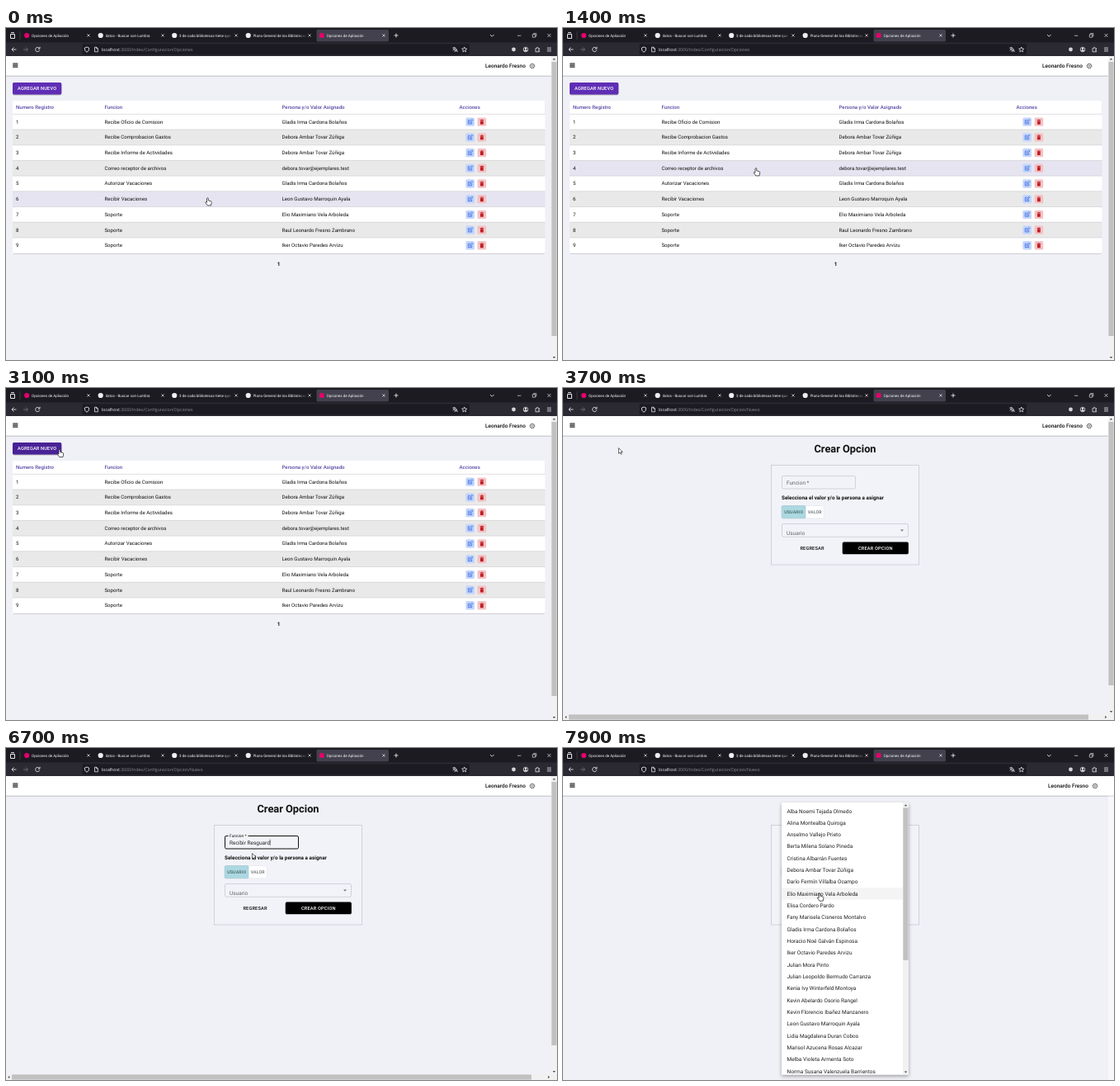
Write an HTML page that moves like this. It is 668x402 px and loops after 8 s.

```html
<!DOCTYPE html>
<html lang="es">
<head>
<meta charset="utf-8">
<style>
html, body { margin: 0; width: 100%; height: 100%; overflow: hidden; background: #f0f1f7; }
svg { display: block; width: 668px; height: 402px; font-family: Roboto, Arial, sans-serif; text-rendering: geometricPrecision; }
.ui { font-family: "Open Sans", "Noto Sans", sans-serif; }
</style>
</head>
<body>
<svg id="stage" viewBox="0 0 668 402" xmlns="http://www.w3.org/2000/svg"></svg>
<script>
const LOOP = 8000;
const PAGE_SWAP = 3600, FOCUS = 4800, MENU_OPEN = 7300;
const ROW_TOP = 104.3, ROW_H = 18.7;
const ITEM_TOP = 69, ITEM_H = 14.33;
const TYPED = "Recibir Resguardos";

const rect = (x, y, w, h, fill, extra = "") =>
  `<rect x="${x}" y="${y}" width="${w}" height="${h}" fill="${fill}" ${extra}/>`;
const text = (x, y, size, str, fill = "#111", weight = 400, extra = "") =>
  `<text x="${x}" y="${y}" font-size="${size}" fill="${fill}" font-weight="${weight}" ${extra}>${str}</text>`;
const line = (d, color = "#fbfbfe", width = .8, extra = "") =>
  `<path d="${d}" fill="none" stroke="${color}" stroke-width="${width}" ${extra}/>`;
const shape = (d, fill) => `<path d="${d}" fill="${fill}"/>`;
const circle = (x, y, r, fill) => `<circle cx="${x}" cy="${y}" r="${r}" fill="${fill}"/>`;
const group = (id, body, extra = "") => `<g id="${id}" ${extra}>${body}</g>`;
const caps = (x, y, str, fill, size = 5.65) =>
  text(x, y, size, str, fill, 500, 'text-anchor="middle" letter-spacing=".16"');

const people = [
  "Alba Noemi Tejada Olmedo", "Alina Montealba Quiroga", "Anselmo Vallejo Prieto",
  "Berta Milena Solano Pineda", "Cristina Albarrán Fuentes", "Debora Ambar Tovar Zúñiga",
  "Darío Fermín Villalba Ocampo", "Elio Maximiano Vela Arboleda", "Elisa Cordero Pardo",
  "Fany Marisela Cisneros Montalvo", "Gladis Irma Cardona Bolaños", "Horacio Noé Galván Espinosa",
  "Iker Octavio Paredes Arvizu", "Julian Mora Pinto", "Julian Leopoldo Bermudo Carranza",
  "Kenia Ivy Winterfeld Montoya", "Kevin Abelardo Osorio Rangel", "Kevin Florencio Ibañez Manzanero",
  "Leon Gustavo Marroquin Ayala", "Lidia Magdalena Duran Cobos", "Marisol Azucena Rosas Alcazar",
  "Melba Violeta Armenta Soto", "Norma Susana Valenzuela Barrientos"
];
const rows = [
  ["Recibe Oficio de Comision", people[10]],
  ["Recibe Comprobacion Gastos", people[5]],
  ["Recibe Informe de Actividades", people[5]],
  ["Correo receptor de archivos", "debora.tovar@ejemplares.test"],
  ["Autorizar Vacaciones", people[10]],
  ["Recibir Vacaciones", people[18]],
  ["Soporte", people[7]],
  ["Soporte", "Raul Leonardo Fresno Zambrano"],
  ["Soporte", people[12]]
];

function browserBar() {
  const tabs = [
    [22, "#e5006d", "Opciones de Apliación", 100],
    [111.5, "#efeff2", "datos - Buscar con Lumbra", 190],
    [201, "#efeff2", "3 de cada bibliotecas tiene que", 279],
    [290.5, "#efeff2", "Plano General de las Bibliotecas", 368],
    [379.5, "#e5006d", "Opciones de Apliación", 458]
  ];
  const cross = (x, y, r) => line(`M${x - r} ${y - r}l${2 * r} ${2 * r}m0 ${-2 * r}l${-2 * r} ${2 * r}`, "#fbfbfe", .65);
  let s = rect(0, 0, 668, 18, "#1c1b22") + rect(0, 17.5, 668, 16.5, "#2b2a33");
  s += line("M5.5 7.5h5v5h-5zM6 5.6h4", "#fbfbfe", .9) + line("M17 4v10", "#55545e", .5);
  s += rect(376.5, 2, 87.5, 14.5, "#42414d", 'rx="1.8"');
  tabs.forEach(([x, color, title, close], i) => {
    s += circle(x + 3.2, 9, 3.1, color);
    s += `<svg x="${x + 9}" y="0" width="66" height="18">${text(0, 10.8, 4.55, title, "#fbfbfe")}</svg>`;
    if (i === 2 || i === 3) s += rect(x + 62, 4, 13, 10, "url(#fade)");
    s += cross(close, 9, 1.6);
  });
  s += line("M470.5 9h5M473 6.5v5") + line("M587 8l2.3 2.3 2.3-2.3") + line("M620 9.3h4.4", "#fbfbfe", .6);
  s += line("M638.3 7.8h3.4v3.4h-3.4zM639.5 7.5v-.9h3.4v3.4h-1", "#fbfbfe", .6) + cross(658.5, 9, 2);
  s += line("M12.5 26h-5.5m2.5-2.5l-2.5 2.5 2.5 2.5") + line("M21 26h5.5m-2.5-2.5l2.5 2.5-2.5 2.5", "#77767f");
  s += line("M40.3 24.4a2.6 2.6 0 1 0 .5 2.1M41 22.8v2.2h-2.2");
  s += rect(92.5, 19.2, 469.5, 13, "#1c1b22", 'rx="1.8"');
  s += line("M98 23l2.6 1c0 3-.6 4.2-2.6 5.2-2-1-2.6-2.2-2.6-5.2z");
  s += line("M107.5 23.2h2.3l1.6 1.6v4h-3.9zM109.6 23.2v1.8h1.8", "#fbfbfe", .7);
  s += `<text x="116" y="27.9" font-size="5.2" fill="#8f8e98"><tspan fill="#fbfbfe">localhost</tspan><tspan id="path"></tspan></text>`;
  s += line("M541.3 24h4m-2-1v1m1.3 0c-.5 1.7-1.7 2.6-3 3.2m.6-2.4c.5 1 1.2 1.6 2 2M544 29l1.7-4 1.7 4m-2.8-1.3h2.2", "#fbfbfe", .7);
  s += line("M555.7 23l.9 2 2.2.2-1.7 1.4.5 2.2-1.9-1.1-1.9 1.1.5-2.2-1.7-1.4 2.2-.2z", "#fbfbfe", .7);
  s += circle(615.5, 26, 2.4, "#d5d5da");
  s += `<circle cx="630" cy="26" r="2.8" fill="none" stroke="#fbfbfe" stroke-width=".7"/>` + circle(630, 25.2, 1.1, "#fbfbfe") + shape("M628 28a2 1.6 0 0 1 4 0z", "#fbfbfe");
  s += line("M642 24.6h1.5c-.5-1.8 2-1.8 1.5 0h1.6v1.5c-1.7-.4-1.7 1.8 0 1.4v1.3H642z", "#fbfbfe", .7);
  s += line("M656 24h5m-5 2h5m-5 2h5", "#fbfbfe", .7);
  return group("bar", s, 'class="ui"');
}

function siteHeader() {
  const ring = (r, width, extra = "") => `<circle cx="638" cy="46" r="${r}" fill="none" stroke="#444" stroke-width="${width}" ${extra}/>`;
  const gear = ring(2.9, .8, 'stroke-dasharray="1.3 .98"') + ring(2.4, .6) + ring(.9, .5);
  return rect(0, 34, 668, 23.6, "#fff", 'filter="url(#soft)"') +
    rect(8.3, 42.4, 6, 5.6, "#999") + line("M8.3 43h6m-6 2.2h6m-6 2.2h6", "#555", 1.2) +
    group("account", text(581, 48.2, 6.5, "Leonardo Fresno", "#111", 500) + gear);
}

function listPage() {
  let s = group("addBtn", rect(8, 66, 59.3, 14.5, "#5e2db4", 'rx="1.7" filter="url(#soft)"')) +
    caps(37.7, 75.2, "AGREGAR NUEVO", "#fff");
  s += rect(8, 88, 645.5, 184.5, "#fff", 'rx="1.7" filter="url(#soft)"');
  [[12, "Numero Registro"], [119.5, "Funcion"], [334.5, "Persona y/o Valor Asignado"], [549.5, "Acciones"]]
    .forEach(([x, label]) => s += text(x, 98.4, 6.1, label, "#5a4aa6", 500));
  rows.forEach(([task, owner], i) => {
    const y = ROW_TOP + i * ROW_H, mid = y + ROW_H / 2, base = mid + 2;
    s += rect(8, y, 645.5, ROW_H, i % 2 ? "#e9e9e9" : "#fff", `id="row${i}"`);
    s += line(`M8 ${y}h645.5`, "#bcbcc2", .5);
    s += text(12, base, 6.1, i + 1) + text(119.5, base, 6.1, task) + text(334.5, base, 6.1, owner);
    s += rect(557.4, mid - 5.2, 10.6, 10.4, "#c3d6fb", 'rx="1.6"') + rect(571.6, mid - 5.2, 10.6, 10.4, "#f3c3c6", 'rx="1.6"');
    s += line(`M562.5 ${mid - 2}h-2.2v4.4h4.4v-2.2M562 ${mid + .8}l.2-1.2 2.7-2.7 1 1-2.7 2.7z`, "#1d4ed8", .65);
    s += shape(`M574.6 ${mid - 2.4}h1.4l.4-.6h1l.4.6h1.4v.8h-4.6zM575 ${mid - 1.2}h3.8v3.6q0 .6-.6.6h-2.6q-.6 0-.6-.6z`, "#c01f25");
  });
  s += text(330.6, 288.2, 6.5, "1", "#111", 700, 'text-anchor="middle"');
  return group("list", s);
}

function formPage() {
  let s = text(342, 77.6, 12.8, "Crear Opcion", "#111", 700, 'text-anchor="middle"');
  s += rect(252.5, 93.5, 179, 120.5, "#f2f3f8", 'stroke="#bdbdc4" stroke-width=".6"');
  s += rect(265.5, 106.5, 89, 15.5, "none", 'rx="1.6" id="field"');
  s += rect(269.5, 105.5, 0, 2, "#f2f3f8", 'id="fieldNotch"');
  s += text(271, 116.6, 6.5, "Funcion *", "#666", 400, 'id="fieldLabel"') + text(271, 116.6, 6.5, "", "#222", 400, 'id="typed"');
  s += rect(271, 110.6, .5, 7.6, "#111", 'id="caret"');
  s += text(265, 134.6, 6.36, "Selecciona el valor y/o la persona a asignar", "#111", 700);
  s += rect(265.2, 142.6, 51, 15.2, "#fff", 'rx="1.6" stroke="#dcdce2" stroke-width=".5"');
  s += rect(265.2, 142.6, 28.8, 15.2, "#abd8e1", 'rx="1.4" stroke="#93bcc6" stroke-width=".5"');
  s += caps(279.7, 152.1, "USUARIO", "#47636b", 5.25) + caps(305.2, 152.1, "VALOR", "#666", 5.25);
  s += rect(265.5, 164.5, 153, 15.8, "none", 'rx="1.6" id="select"');
  s += rect(269.5, 163.5, 0, 2, "#f2f3f8", 'id="selectNotch"');
  s += text(271, 177.6, 6.5, "Usuario", "#666", 400, 'id="selectLabel"');
  s += `<path id="arrow" d="M-2-1h4L0 1z" fill="#666"/>`;
  s += caps(302, 196, "REGRESAR", "#111");
  s += rect(338.8, 186.5, 80, 14.4, "#000", 'rx="1.6" filter="url(#soft)"') + caps(378.8, 196, "CREAR OPCION", "#fff");
  return group("form", s);
}

function menu() {
  let s = rect(265, 66, 154, 329.5, "#fff", 'rx="1.6" filter="url(#lift)"');
  s += rect(265, 0, 147, ITEM_H, "#f4f4f4", 'id="itemHover"');
  people.forEach((name, i) => s += text(271.5, ITEM_TOP + i * ITEM_H + 9.5, 6.5, name, "#222"));
  s += rect(412, 66, 7, 329.5, "#f1f1f1") + rect(412.4, 72.5, 6.2, 184.5, "#c1c1c1");
  s += shape("M413.7 70.3h3.6l-1.8-2zM413.7 391.4h3.6l-1.8 2z", "#505050");
  return group("menu", s);
}

function scrollbars() {
  const bar = (bottom, end) => rect(661, 34, 7, bottom - 34, "#f1f1f1") + rect(661.4, 41, 6.2, end - 41, "#c1c1c1") +
    shape(`M662.7 38.6h3.6l-1.8-2zM662.7 ${bottom - 4}h3.6l-1.8 2z`, "#505050");
  return group("listBars", bar(402, 373)) +
    group("formBars", rect(0, 395, 668, 7, "#f1f1f1") + bar(395, 360) + rect(7, 395.4, 630, 6.2, "#c1c1c1") +
      shape("M4.3 396.7v3.6l-2-1.8zM657.2 396.7v3.6l2-1.8z", "#505050")) +
    group("gutter", rect(661, 58.5, 7, 343.5, "#f8f8fb"));
}

const cursors = group("cursor",
  group("hand", `<path d="M0 .9Q.9-.6 1.8.9V3.6L5 4.5Q5.9 4.9 5.7 6L5 9.6H.8L-1.8 6Q-1.6 4.6 0 5.9Z" fill="#fff" stroke="#111" stroke-width=".7"/>`) +
  group("pointer", `<path d="M0 0V6.7L1.6 5.3 2.7 7.7 3.8 7.2 2.7 4.8H4.8Z" fill="#fff" stroke="#111" stroke-width=".6"/>`) +
  group("beam", line("M-1.6-3.4h1.3l.3.4.3-.4H1.6M0-3V3M-1.6 3.4h1.3L0 3l.3.4H1.6", "#111", .7)));

const stage = document.getElementById("stage");
stage.innerHTML = `<defs>
  <linearGradient id="fade"><stop offset="0" stop-color="#1c1b22" stop-opacity="0"/><stop offset="1" stop-color="#1c1b22"/></linearGradient>
  <filter id="soft" x="-10%" y="-20%" width="120%" height="150%"><feDropShadow dx="0" dy=".6" stdDeviation=".6" flood-opacity=".4"/></filter>
  <filter id="lift" x="-10%" y="-10%" width="120%" height="120%"><feDropShadow dx="0" dy="2" stdDeviation="2" flood-opacity=".35"/></filter>
</defs>` + rect(0, 0, 668, 402, "#f0f1f7") + listPage() + formPage() + siteHeader() + scrollbars() + menu() + browserBar() + cursors;

const el = {};
stage.querySelectorAll("[id]").forEach(node => el[node.id] = node);
const show = (node, on) => node.setAttribute("display", on ? "inline" : "none");
const set = (node, attrs) => { for (const k in attrs) node.setAttribute(k, attrs[k]); };
const clamp01 = v => Math.max(0, Math.min(1, v));
const mix = (a, b, p) => a + (b - a) * p;

// Each key is [time, value, value...], joined linearly.
function track(keys, t) {
  const next = keys.findIndex(k => k[0] > t);
  if (next < 0) return keys[keys.length - 1].slice(1);
  if (next === 0) return keys[0].slice(1);
  const a = keys[next - 1], b = keys[next], p = (t - a[0]) / (b[0] - a[0]);
  return a.slice(1).map((v, i) => mix(v, b[i + 1], p));
}
const mousePath = [
  [0, 243.5, 205.3], [500, 243.5, 205.3], [1300, 237, 181], [1400, 233, 169.3], [1750, 233, 169.3],
  [2200, 387.2, 114.8], [2600, 300, 80], [3100, 64, 74], [3500, 66.5, 73], [3700, 67.5, 72.6],
  [3950, 67.5, 72.6], [4350, 190, 97], [4750, 295.5, 117], [6600, 295.5, 117], [7100, 310.2, 169.1],
  [7500, 310.2, 169.1], [7800, 310.2, 175.6]
];
const typing = [[5700, 0], [5800, 2], [6000, 7], [6150, 7], [6800, 18]];
const menuFade = [[7300, 0], [7400, .19], [7600, 1]];

function floatLabel(label, notch, p, restY, topY) {
  set(label, { "font-size": mix(6.5, 4.88, p), y: mix(restY, topY, p) });
  set(notch, { width: 24 * p * (label === el.selectLabel ? .82 : 1) });
}
function outline(node, focused, hovered) {
  set(node, { stroke: focused || hovered ? "#111" : "#bdbdc4", "stroke-width": focused ? 1 : .6 });
}

function draw(t) {
  const [x, y] = track(mousePath, t);
  const inside = (l, top, r, b) => x >= l && x <= r && y >= top && y <= b;
  const onForm = t >= PAGE_SWAP, open = t >= MENU_OPEN;

  show(el.list, !onForm);
  show(el.listBars, !onForm);
  show(el.form, onForm);
  show(el.formBars, onForm && !open);
  show(el.gutter, open);
  set(el.account, { transform: `translate(${open ? 7 : 0} 0)` });
  el.path.textContent = ":3000/Index/Configuracion/" + (onForm ? "Opcion/Nuevo" : "Opciones");

  const hovered = Math.floor((y - ROW_TOP) / ROW_H);
  rows.forEach((_, i) => set(el["row" + i], { fill: i === hovered ? "#e6e4f1" : i % 2 ? "#e9e9e9" : "#fff" }));
  const onAdd = inside(8, 66, 67.3, 80.5);
  el.addBtn.firstChild.setAttribute("fill", onAdd ? "#4a2396" : "#5e2db4");

  const focused = t >= FOCUS && !open;
  const onField = inside(265, 106, 355, 122), onSelect = inside(265, 164, 419, 181);
  outline(el.field, focused, onField);
  outline(el.select, open, onSelect);
  floatLabel(el.fieldLabel, el.fieldNotch, clamp01((t - FOCUS + 60) / 200), 116.6, 108);
  floatLabel(el.selectLabel, el.selectNotch, clamp01((t - MENU_OPEN + 60) / 120), 177.6, 166);
  set(el.fieldLabel, { fill: focused ? "#111" : "#666" });
  set(el.selectLabel, { fill: open ? "#111" : "#666" });
  set(el.arrow, { transform: `translate(411 172.5) scale(1 ${open ? -1 : 1})` });

  const count = Math.floor(track(typing, t)[0]);
  el.typed.textContent = TYPED.slice(0, count);
  show(el.caret, focused && (t < 5300 || t >= 5750));
  set(el.caret, { x: 271 + (count ? el.typed.getComputedTextLength() : 0) });

  // The menu grows out of the select's centre.
  const [alpha] = track(menuFade, t);
  show(el.menu, open);
  set(el.menu, {
    opacity: alpha,
    transform: `translate(342 172) scale(${mix(.982, 1, alpha)} ${mix(.976, 1, alpha)}) translate(-342 -172)`
  });
  set(el.itemHover, { y: ITEM_TOP + ITEM_H * Math.floor((y - ITEM_TOP) / ITEM_H) });

  const overRows = !onForm && hovered >= 0;
  const overToggle = inside(265, 142, 316, 158);
  const hand = onForm ? open || onSelect || overToggle : overRows || onAdd;
  const beam = onForm && onField;
  show(el.hand, hand);
  show(el.beam, beam);
  show(el.pointer, !hand && !beam);
  set(el.cursor, { transform: `translate(${x} ${y})` });
}

const start = performance.now();
function tick() {
  draw((performance.now() - start) % LOOP);
  requestAnimationFrame(tick);
}
tick();
</script>
</body>
</html>
```
